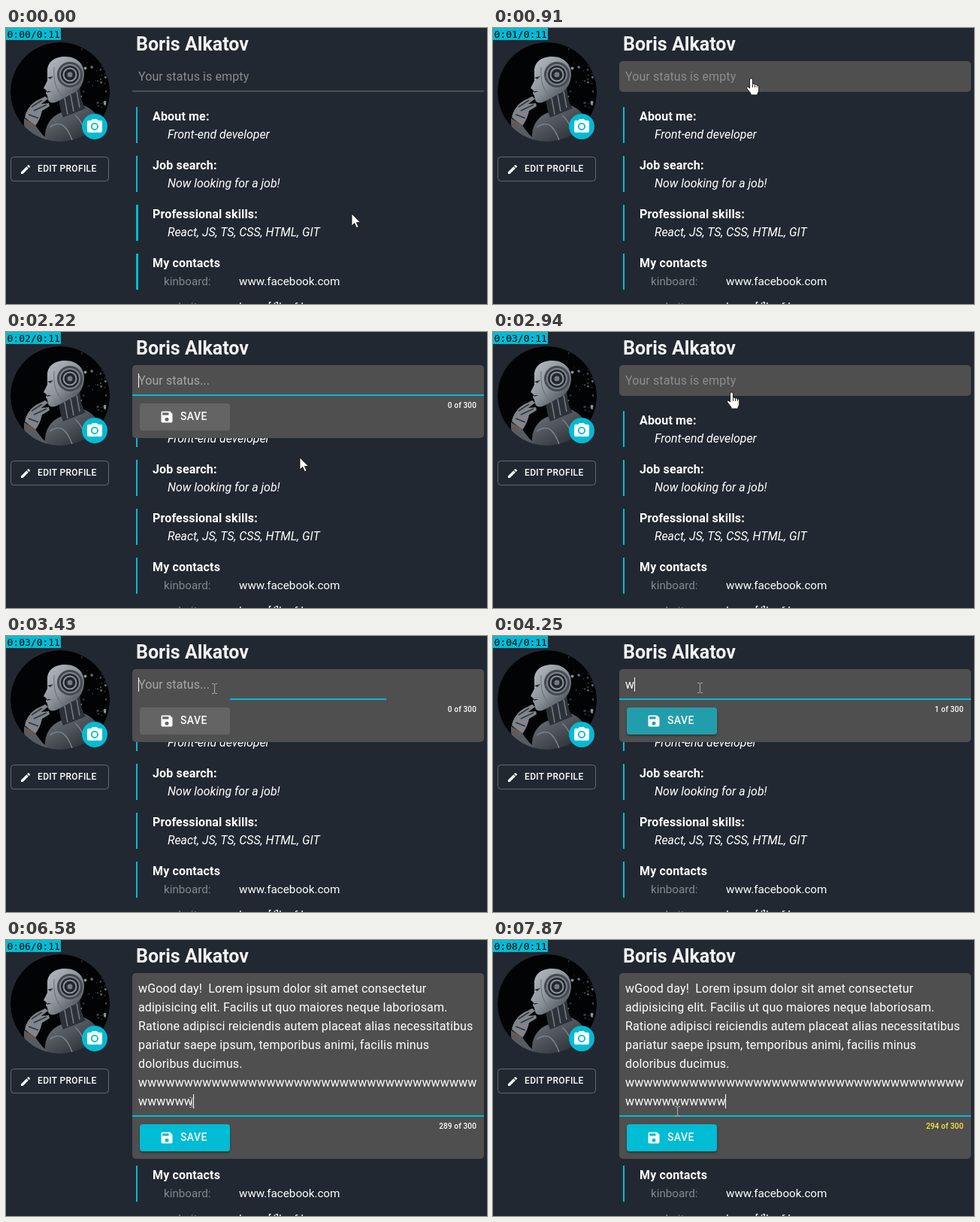
An HTML page for the animation above (8000 ms loop, 640 by 367 pixels).

```html
<!DOCTYPE html>
<html lang="en">
<head>
<meta charset="utf-8">
<title>Profile status editor</title>
<style>
  html, body { margin: 0; width: 100%; height: 100%; overflow: hidden; background: #222831; }
  svg { display: block; width: 640px; height: 367px; }
  text { font: 16px Roboto, sans-serif; fill: #fff; white-space: pre; }
  .name { font-size: 25px; font-weight: 700; fill: #f4f4f4; }
  .title { font-weight: 700; letter-spacing: .15px; }
  .value { font-size: 15.85px; font-style: italic; }
  .contact { font-size: 15.2px; }
  .label { font-size: 15.2px; fill: #85888d; }
  .input { letter-spacing: .15px; }
  .hint { letter-spacing: .1px; }
  .count { font-size: 10px; font-weight: 500; letter-spacing: .15px; text-anchor: end; }
  .button { font-size: 14px; font-weight: 500; letter-spacing: .4px; }
  .small { font-size: 12px; letter-spacing: .34px; }
  .timer { font: 13px "DejaVu Sans Mono", monospace; fill: #000; }
</style>
</head>
<body>
<svg viewBox="0 0 640 367">
  <defs>
    <clipPath id="round"><circle cx="72" cy="85" r="66"/></clipPath>
    <linearGradient id="skin" x1="0" y1="0" x2="1" y2="1">
      <stop offset="0" stop-color="#bcc1c8"/>
      <stop offset=".5" stop-color="#8c9299"/>
      <stop offset="1" stop-color="#353a41"/>
    </linearGradient>
    <linearGradient id="metal" x1="0" y1="0" x2="1" y2="1">
      <stop offset="0" stop-color="#757b83"/>
      <stop offset="1" stop-color="#1a1e23"/>
    </linearGradient>
    <filter id="soft"><feGaussianBlur stdDeviation=".6"/></filter>
    <filter id="shadow" x="-10%" y="-20%" width="120%" height="160%">
      <feDropShadow dx="0" dy="2" stdDeviation="1.5" flood-opacity=".35"/>
    </filter>
  </defs>
  <rect width="640" height="367" fill="#222831"/>

  <g clip-path="url(#round)">
    <circle cx="72" cy="85" r="66" fill="#020304"/>
    <g filter="url(#soft)">
      <g id="sparks" fill="#9aa4af"/>
      <path d="M52 152C50 132 58 119 72 113L103 103C116 107 127 119 134 152Z" fill="url(#metal)"/>
      <path d="M70 90L98 76C99 90 101 101 106 107L76 119C72 110 71 100 70 90Z" fill="#2d3238"/>
      <path d="M78 93l4 22M86 89l4 22M94 84l4 22" stroke="#767c83" stroke-width="1.5" fill="none"/>
      <path d="M55 57C55 45 65 38 79 38C95 38 105 49 104 63C103 77 96 84 87 88L70 97C63 101 57 100 56 95L55 90 53 87 54 83 50 80 55 70Z" fill="url(#skin)"/>
      <path d="M55 66l8-2-4 4ZM54 84l7 0-6 2Z" fill="#282b2f"/>
      <path d="M64 52C63 70 66 82 76 91" fill="none" stroke="#686d73"/>
      <circle cx="85" cy="62" r="17" fill="#454a51"/>
      <circle cx="85" cy="62" r="14" fill="#7f858c"/>
      <circle cx="85" cy="62" r="12" fill="#23272c"/>
      <circle cx="85" cy="62" r="8.5" fill="none" stroke="#8f959c" stroke-width="2"/>
      <circle cx="85" cy="62" r="3.5" fill="#747a81"/>
      <path d="M25 119C27 108 34 101 40 97L52 91 56 94 47 101 57 100 58 104 48 110C46 119 43 125 39 130Z" fill="#80858b"/>
      <path d="M34 105l14-9M37 110l17-8M30 115l13 5" stroke="#33373c" stroke-width="1.5" fill="none"/>
      <path d="M24 120L38 128C44 137 51 145 60 153H32C27 143 23 132 24 120Z" fill="#565c63"/>
      <path d="M25 124l12 6" stroke="#80543d" stroke-width="2"/>
      <path d="M58 132C70 124 80 125 89 152M92 116C102 125 106 136 108 152" stroke="#7c8289" stroke-width="1.5" fill="none"/>
    </g>
  </g>
  <circle cx="118" cy="131" r="17" fill="#00bcd4"/>
  <g transform="translate(106 119)">
    <path d="M9 2L7.17 4H4c-1.1 0-2 .9-2 2v12c0 1.1.9 2 2 2h16c1.1 0 2-.9 2-2V6c0-1.1-.9-2-2-2h-3.17L15 2H9zm3 15c-2.76 0-5-2.24-5-5s2.24-5 5-5 5 2.24 5 5-2.24 5-5 5z" fill="#fff"/>
    <circle cx="12" cy="12" r="3.2" fill="#fff"/>
  </g>
  <rect x="6.5" y="171.5" width="130" height="32" rx="4" fill="none" stroke="#646970"/>
  <path transform="translate(18 180) scale(.6667)" fill="#fff" d="M3 17.25V21h3.75L17.81 9.94l-3.75-3.75L3 17.25zM20.71 7.04c.39-.39.39-1.02 0-1.41l-2.34-2.34c-.39-.39-1.02-.39-1.41 0l-1.83 1.83 3.75 3.75 1.83-1.83z"/>
  <text class="button small" x="42" y="191">EDIT PROFILE</text>
  <text class="name" x="173" y="30">Boris Alkatov</text>

  <g id="sections"></g>
  <text class="label" x="210" y="342">kinboard:</text>
  <text class="contact" x="310" y="342">www.facebook.com</text>
  <text class="label" x="210" y="376">website:</text>
  <text class="contact" x="310" y="376">lorem[/]leaf.l</text>

  <rect id="idleLine" x="168" y="83" width="468" height="2" fill="#4f5054"/>
  <rect id="panel" x="168" y="44" width="468" rx="5" fill="#4f4f4f"/>
  <text id="hint" class="hint" x="176" y="70"></text>
  <g id="editor">
    <g id="lines"></g>
    <rect id="caret" width="1" height="19" fill="#fff"/>
    <g id="footer">
      <rect id="underline" y="83" height="2" fill="#00bcd4"/>
      <text id="count" class="count" x="626" y="101"></text>
      <rect id="save" x="178" y="95" width="120" height="36" rx="4"/>
      <path transform="translate(204 103) scale(.8333)" fill="#fff" d="M17 3H5c-1.11 0-2 .9-2 2v14c0 1.1.89 2 2 2h14c1.1 0 2-.9 2-2V7l-4-4zm-5 16c-1.66 0-3-1.34-3-3s1.34-3 3-3 3 1.34 3 3-1.34 3-3 3zm3-10H5V5h10v4z"/>
      <text class="button" x="232" y="117">SAVE</text>
    </g>
  </g>

  <rect width="73" height="16" fill="#00bcd4"/>
  <text id="timer" class="timer" x="1.5" y="13"></text>

  <g id="pointer">
    <path id="arrow" d="M0 0V16L3.7 12.6 6.4 18.6 9 17.4 6.3 11.6H11.4Z" fill="#fff" stroke="#111" stroke-width=".8"/>
    <g id="hand" stroke="#111" stroke-width=".9">
      <path d="M-1.5 2Q-1.5 0 .5 0T2.5 2V7.5Q3.7 6.3 5.5 8 7.1 7 8.3 9 10.7 8.4 10.7 11V15Q10.7 18 9 20V22H0V20L-4.8 14Q-6.2 11.7 -4.4 11.2 -3 11 -1.5 13Z" fill="#fff"/>
      <path d="M2.5 7.5V12M5.5 8V12M8.3 9V12" fill="none"/>
    </g>
    <path id="beam" d="M-3 -6.5H-1L.5 -5.5 2 -6.5H4M.5 -5.5V5.5M-3 6.5H-1L.5 5.5 2 6.5H4" fill="none" stroke="#aaa"/>
  </g>
</svg>
<script>
const LOOP = 8000;
const $ = id => document.getElementById(id);
const NS = 'http://www.w3.org/2000/svg';

function add(parent, tag, attrs, content = '') {
  const el = document.createElementNS(NS, tag);
  set(el, attrs);
  el.textContent = content;
  parent.append(el);
  return el;
}
function set(el, attrs) {
  for (const key in attrs) el.setAttribute(key, attrs[key]);
}
const show = (el, on) => { el.style.display = on ? '' : 'none'; };
const ramp = (t, start, length) => Math.min(1, Math.max(0, (t - start) / length));
const easeOut = p => 1 - (1 - p) ** 2;
const mix = (a, b, p) => `rgb(${a.map((v, i) => Math.round(v + (b[i] - v) * p))})`;
const within = (t, spans) => spans.some(([a, b]) => t >= a && t < b);

const secondMarks = [910, 1880, 2940, 3910, 4790, 5960, 6920, 7870];
const openSpans = [[1040, 2360], [3380, LOOP]];
const caretOff = [[1600, 2150], [3910, 4180], [4790, 5190], [5760, 6280], [6780, 6920]];
const typedW = [6920, 7270, 7400, 7670, 7870];
const path = [
  [70, 460, 247], [840, 343, 67], [1110, 343, 67], [1600, 389, 158], [1880, 391, 166],
  [2300, 391, 167], [2870, 317, 80], [3010, 317, 80], [3500, 275, 69],
  [5960, 275, 69], [6700, 245, 227], [6780, 245, 228]
];
const sections = [
  { title: 'About me:', value: 'Front-end developer', hovers: [[470, 610], [1300, 1600], [2440, 2665]] },
  { title: 'Job search:', value: 'Now looking for a job!', hovers: [[260, 420]] },
  { title: 'Professional skills:', value: 'React, JS, TS, CSS, HTML, GIT', hovers: [[-80, 190]] },
  { title: 'My contacts', value: '', hovers: [[-500, -165]] }
];
const pasted = [
  'wGood day!  Lorem ipsum dolor sit amet consectetur',
  'adipisicing elit. Facilis ut quo maiores neque laboriosam.',
  'Ratione adipisci reiciendis autem placeat alias necessitatibus',
  'pariatur saepe ipsum, temporibus animi, facilis minus',
  'doloribus ducimus.'
];
const ROW_W = 37;

sections.forEach((s, i) => {
  const y = 105 + 65 * i;
  s.bar = add($('sections'), 'rect', { x: 173, y, height: 48, fill: '#00bcd4' });
  add($('sections'), 'text', { class: 'title', x: 195, y: y + 18 }, s.title);
  add($('sections'), 'text', { class: 'value', x: 215, y: y + 42 }, s.value);
});
const rows = Array.from({ length: 7 }, (_, i) =>
  add($('lines'), 'text', { class: 'input', x: 176, y: 70 + 25 * i }));

let seed = 7;
const random = () => (seed = seed * 16807 % 2147483647) / 2147483647;
for (let i = 0; i < 45; i++) {
  add($('sparks'), 'circle', {
    cx: 98 + 38 * random(), cy: 28 + 82 * random(),
    r: .5 + 1.5 * random() ** 2, opacity: .2 + .7 * random()
  });
}

function pointerAt(t) {
  const next = path.findIndex(k => k[0] > t);
  if (next === 0) return path[0].slice(1);
  if (next < 0) return path[path.length - 1].slice(1);
  const [t0, x0, y0] = path[next - 1], [t1, x1, y1] = path[next];
  const u = (t - t0) / (t1 - t0), p = u * u * (3 - 2 * u);
  return [x0 + (x1 - x0) * p, y0 + (y1 - y0) * p];
}

// The run of w's wraps without a space, so it counts as one word.
function textAt(t) {
  if (t < 4180) return { lines: [''], chars: 0 };
  if (t < 5190) return { lines: ['w'], chars: 1 };
  const run = 'w'.repeat(ROW_W + 6 + typedW.filter(k => t >= k).length);
  return {
    lines: [...pasted, run.slice(0, ROW_W), run.slice(ROW_W)],
    chars: [...pasted, run].join(' ').length
  };
}

function drawEditor(t) {
  const openedAt = openSpans.find(([a, b]) => t >= a && t < b)[0];
  const { lines, chars } = textAt(t);
  const end = lines.length - 1;
  const extra = 25 * end;
  rows.forEach((row, i) => { row.textContent = lines[i] || ''; });

  const width = chars ? rows[end].getComputedTextLength() : 0;
  set($('caret'), { x: Math.floor(176 + width), y: 55 + extra });
  show($('caret'), !within(t, caretOff));

  const half = 234 * easeOut(ramp(t, openedAt, 200));
  set($('underline'), { x: 402 - half, width: 2 * half });
  set($('footer'), { transform: `translate(0 ${extra})` });
  $('count').textContent = `${chars} of 300`;
  $('count').style.fill = mix([255, 255, 255], [255, 235, 59], ramp(t, 6900, 150));
  const enabled = easeOut(ramp(t, 4150, 250));
  set($('save'), {
    fill: mix([100, 100, 100], [0, 188, 212], enabled),
    filter: enabled ? 'url(#shadow)' : 'none'
  });
  return extra;
}

function draw(t) {
  const open = within(t, openSpans);
  const [x, y] = pointerAt(t);

  $('timer').textContent = `0:0${secondMarks.filter(k => t >= k).length}/0:11`;
  for (const { bar, hovers } of sections) {
    const grow = hovers.reduce((sum, [a, b]) => sum + ramp(t, a, 250) - ramp(t, b, 250), 0);
    set(bar, { width: 2 + 3 * Math.min(1, grow) });
  }

  show($('editor'), open);
  const extra = open ? drawEditor(t) : 0;
  const hover = open ? 1 : t < 2360 ? ramp(t, 690, 150) : ramp(t, 2790, 130);
  set($('panel'), { height: open ? 97 + extra : 41, opacity: hover });
  show($('idleLine'), hover < 1);
  $('hint').textContent = !open ? 'Your status is empty' : t < 4180 ? 'Your status...' : '';
  $('hint').style.fill = open ? '#a7a7a7' : '#8b8d91';

  const overField = y < 85 + extra;
  show($('arrow'), !overField);
  show($('hand'), overField && !open);
  show($('beam'), overField && open);
  set($('pointer'), { transform: `translate(${Math.round(x)} ${Math.round(y)})` });
}

function tick() {
  draw(performance.now() % LOOP);
  requestAnimationFrame(tick);
}
tick();
</script>
</body>
</html>
```
